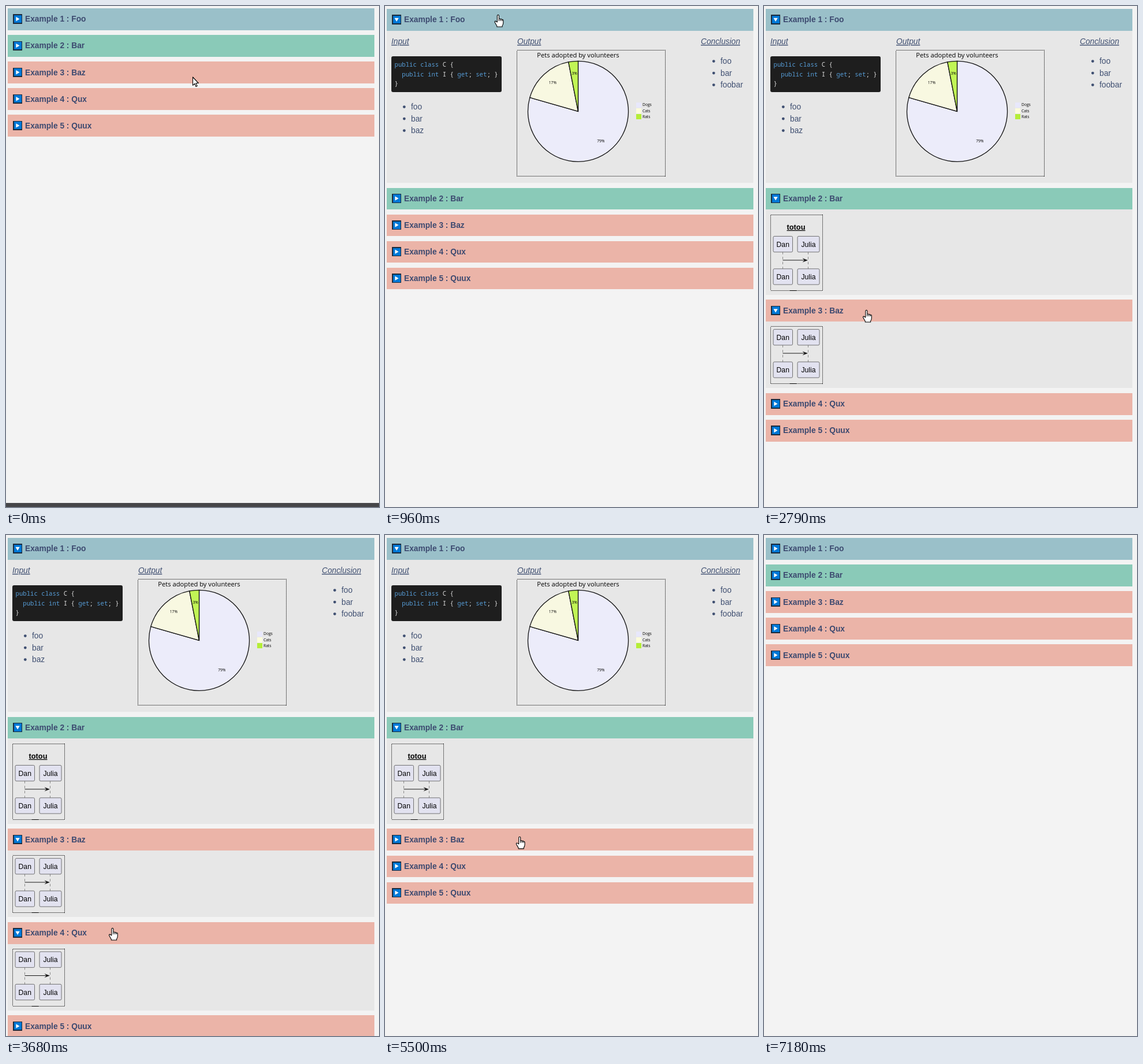
Write an HTML page that moves like this. It is 646 px wide and 867 px high and loops after 7.84 s.

```html
<!DOCTYPE html>
<html lang="en">
<head>
<meta charset="utf-8">
<title>Collapsible examples</title>
<style>
  html, body { margin: 0; width: 100%; height: 100%; overflow: hidden; background: #f3f3f3; }
  svg { display: block; }
  text { font: 13.75px "Liberation Sans", Arial, sans-serif; fill: #3f4f71; white-space: pre; }
  rect { shape-rendering: crispEdges; }
  .head { font-weight: bold; fill: #3d4a70; }
  .label { font-style: italic; text-decoration: underline; }
  .code { font: 10.67px "Noto Sans Mono", monospace; fill: #dcdcdc; }
  .code tspan { fill: #569cd6; }
  .chart { font: 6.7px "Open Sans", sans-serif; fill: #000; }
  .actor { font-size: 12.2px; fill: #000; }
  .mid { text-anchor: middle; }
  .frame { fill: none; stroke: #000; stroke-dasharray: 1 1; }
  .mouse { fill: #fff; stroke: #000; stroke-width: 1.1; stroke-linejoin: round; }
</style>
</head>
<body>
<svg id="stage" width="646" height="867" viewBox="0 0 646 867"></svg>
<script>
const LOOP = 7840;
const HEAD = 37.6, PITCH = 46.1;
const stage = document.getElementById('stage');

const text = (x, y, str, cls = '', style = '') =>
  `<text x="${x}" y="${y}" class="${cls}" style="${style}">${str}</text>`;
const rect = (x, y, w, h, attrs) =>
  `<rect x="${x}" y="${y}" width="${w}" height="${h}" ${attrs}/>`;
const list = (x, y, items) => items.map((item, i) =>
  `<circle cx="${x - 11.7}" cy="${y - 4.4 + i * 20.5}" r="2.4" fill="#3f4f71"/>` +
  text(x, y + i * 20.5, item)).join('');

function pie(cx, cy, r) {
  const slices = [['Dogs', 386, '#ececfa', '#e8e8fb'],
                  ['Cats', 85, '#f8f8e1', '#fbfbdc'],
                  ['Rats', 15, '#c1f555', '#b5ee37']];
  const total = 486;
  const at = (f, d) => {
    const a = f * 2 * Math.PI;
    return [cx + d * Math.sin(a), cy - d * Math.cos(a)];
  };
  let from = 0, shapes = '', labels = '';
  slices.forEach(([name, n, fill, key], i) => {
    const part = n / total, to = from + part;
    const [mx, my] = at(from + part / 2, r * 0.75);
    shapes += `<path d="M${cx} ${cy}L${at(from, r)}A${r} ${r} 0 ${+(part > 0.5)} 1 ${at(to, r)}Z"
      fill="${fill}" stroke="#111" stroke-width="1.3"/>`;
    labels += text(mx, my + 1.2, Math.floor(part * 100) + '%', 'chart mid') +
      rect(435, 161.5 + i * 10.2, 9, 9, `fill="${key}"`) +
      text(446, 168.3 + i * 10.2, name, 'chart');
    from = to;
  });
  return shapes + labels;
}

function firstBody() {
  const k = word => `<tspan>${word}</tspan>`;
  return text(11, 61, 'Input', 'label') + text(229, 61, 'Output', 'label') +
    text(547, 61, 'Conclusion', 'label') +
    '<rect x="11" y="82" width="191" height="62" rx="3" fill="#1e1e1e" style="shape-rendering:auto"/>' +
    text(16.5, 100, `${k('public class')} C {`, 'code') +
    text(16.5, 116.5, `  ${k('public int')} I { ${k('get')}; ${k('set')}; }`, 'code') +
    text(16.5, 133, '}', 'code') +
    list(45, 174, ['foo', 'bar', 'baz']) +
    list(581, 95, ['foo', 'bar', 'foobar']) +
    rect(228.5, 71.5, 257, 218, 'class="frame"') +
    text(334.5, 83.5, 'Pets adopted by volunteers', 'chart mid', 'font-size:11.2px') +
    pie(334.5, 177.3, 87);
}

function sequence(title) {
  const y = title ? 84 : 51.2;
  const actor = (x, w, top, name) =>
    `<rect x="${x}" y="${top}" width="${w}" height="27.3" rx="2" fill="#e2e2f0" stroke="#555"
      stroke-width=".8" style="shape-rendering:auto"/>` +
    text(x + w / 2, top + 18.2, name, 'actor mid');
  const row = top => actor(16, 33.5, top, 'Dan') + actor(58, 38, top, 'Julia');
  return rect(11.5, 46.5, 90, title ? 131 : 99, 'class="frame"') +
    (title ? text(55.5, 72.4, title, 'mid',
      'font-size:12.8px;font-weight:bold;fill:#000;text-decoration:underline') : '') +
    `<path d="M32.5 ${y + 27}v30M76.5 ${y + 27}v30" stroke="#888" stroke-dasharray="4.3 4.3"/>` +
    row(y) + row(y + 56.3) +
    `<path d="M32.5 ${y + 41.4}h40" stroke="#181818"/>
     <path d="M76 ${y + 41.4}l-9.5 -3.6l3.6 3.6l-3.6 3.6z" fill="#181818"/>`;
}

// Each section is open from `open` until `shut`.
const sections = [
  { name: 'Foo', color: '#9ac0c9', height: 263.4, body: firstBody(), open: 960, shut: 7180 },
  { name: 'Bar', color: '#8acab8', height: 147.8, body: sequence('totou'), open: 1920, shut: 6300 },
  { name: 'Baz', color: '#ebb4a8', height: 115.4, body: sequence(), open: 2730, shut: 5430 },
  { name: 'Qux', color: '#ebb4a8', height: 115.4, body: sequence(), open: 3680, shut: 4620 },
  { name: 'Quux', color: '#ebb4a8', height: 0, body: '', open: LOOP, shut: LOOP }
];

stage.innerHTML = sections.map((s, i) => `<g class="section">
    <g class="body">${rect(2.5, HEAD, 635.5, s.height, 'fill="#e7e7e7"')}${s.body}</g>
    ${rect(2.5, 0, 635.5, HEAD, `fill="${s.color}"`)}
    <rect x="12.8" y="11.2" width="14.6" height="14.6" fill="#0078d7" stroke="#1b2a3c" stroke-width="1.6"/>
    <path class="mark" d="M17.4 14.8L23.6 18.5L17.4 22.2Z" fill="#fff"/>
    ${text(33, 23.4, `Example ${i + 1} : ${s.name}`, 'head')}
  </g>`).join('') +
  rect(0, 860, 646, 7, 'id="bar" fill="#464649"') +
  `<g id="cursor">
    <circle id="click" r="10.3" fill="#ff0" fill-opacity=".47"/>
    <path id="arrow" class="mouse" d="M0 0V14.3L3.2 11.3L5.5 16.4L7.6 15.5L5.4 10.5H9.8Z"/>
    <g id="hand" class="mouse">
      <path d="M-1.6 13.2V1.9a1.5 1.5 0 0 1 3 0V7.4q1.5-1 2.8.4q1.6-.8 2.6.7q2-.4 2 1.7V14q0 3-1.7 5v2H-2.2v-1.5L-5.6 13.6q-.8-2 .5-2.5q1.2-.2 3.5 2.1"/>
      <path d="M1.4 7.4V11M4.2 7.8V11M6.8 8.5V11" fill="none"/>
    </g>
  </g>`;

const $ = id => document.getElementById(id);
const groups = [...stage.querySelectorAll('.section')];
const show = (el, on) => el.setAttribute('visibility', on ? 'visible' : 'hidden');

// Pointer stops: time, x, y
const path = [
  [0, 323.5, 123], [70, 323.5, 123], [410, 188, 9], [550, 188, 9], [690, 196, 15],
  [1050, 196, 15], [1580, 185, 327], [1980, 185, 327], [2530, 177.5, 526],
  [2860, 177.5, 526], [3340, 184, 677], [3400, 184.5, 680], [4680, 184.5, 680],
  [5020, 230, 531], [5430, 230, 531], [5980, 302, 331], [6210, 302, 331],
  [6300, 308.5, 313], [6910, 432, 27], [LOOP, 432, 27]
];
const clicks = [[890, 960], [1780, 1920], [2590, 2730], [3540, 3680],
                [4480, 4620], [5290, 5430], [6170, 6240], [7050, 7180]];

function pointer(t) {
  const i = path.findIndex(p => p[0] > t);
  const [t0, x0, y0] = path[i - 1], [t1, x1, y1] = path[i];
  const u = (t - t0) / (t1 - t0), e = u * u * (3 - 2 * u);
  return [x0 + (x1 - x0) * e, y0 + (y1 - y0) * e];
}

function draw(now) {
  const t = now % LOOP;
  const [px, py] = pointer(t);
  let y = t < 960 ? 4 : 5, overHead = false;
  sections.forEach((s, i) => {
    const open = t >= s.open && t < s.shut;
    const g = groups[i];
    g.setAttribute('transform', `translate(0 ${y})`);
    show(g.querySelector('.body'), open);
    g.querySelector('.mark').setAttribute('transform', open ? 'rotate(90 20.1 18.5)' : '');
    if (py > y - 2 && py < y + HEAD) overHead = true;
    y += PITCH + (open ? s.height : 0);
  });
  const inside = t < 7180, hand = overHead && t >= 70;
  $('cursor').setAttribute('transform', `translate(${px} ${py})`);
  show($('hand'), inside && hand);
  show($('arrow'), inside && !hand);
  show($('click'), clicks.some(([a, b]) => t >= a && t < b));
  show($('bar'), t < 960);
}

const start = performance.now();
function tick() {
  draw(performance.now() - start);
  requestAnimationFrame(tick);
}
tick();
</script>
</body>
</html>
```
